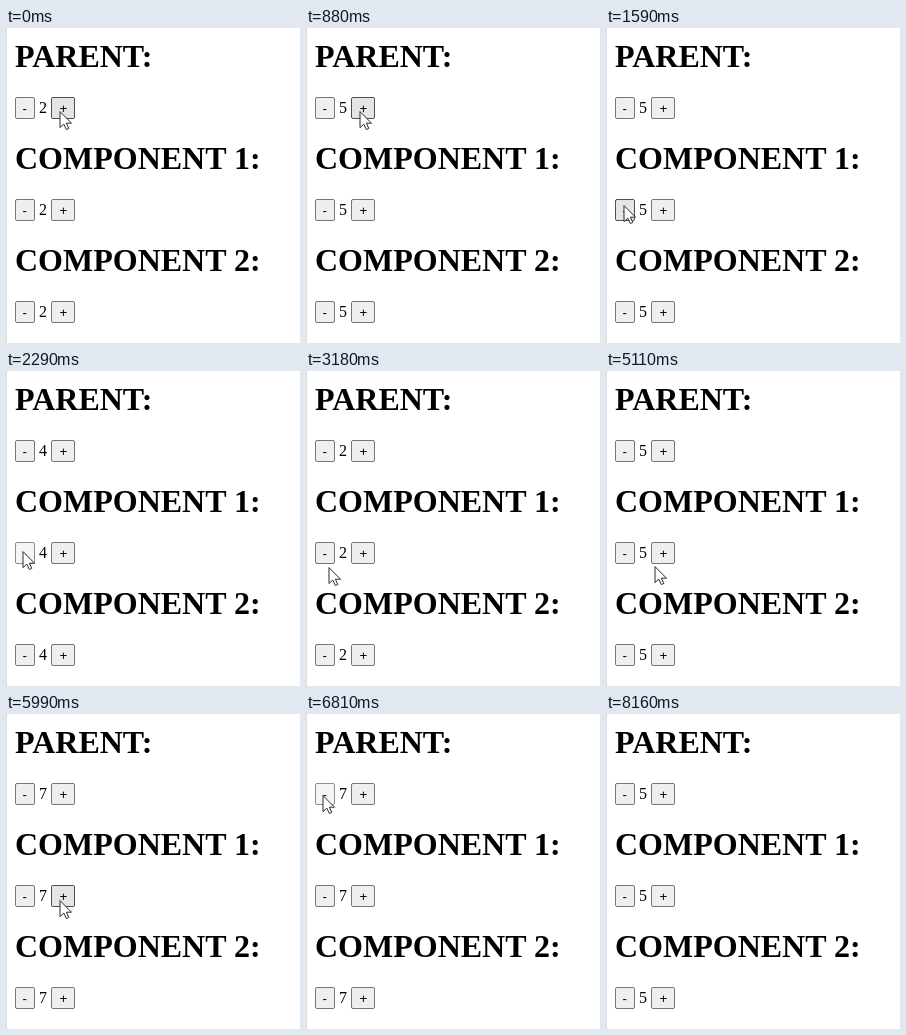
Write an HTML page that moves like this. It is 294 by 315 pixels and loops after 8590 ms.

```html
<!DOCTYPE html>
<html lang="en">
<head>
<meta charset="utf-8">
<title>Shared counter</title>
<style>
  html, body { margin: 0; width: 100%; height: 100%; overflow: hidden; background: #fff; }
  svg { display: block; width: 294px; height: 315px; }
  text { fill: #000; }
  .title { font: bold 32px "Liberation Serif", "Times New Roman", serif; }
  .value { font: 16px "Liberation Serif", "Times New Roman", serif; }
  .label { font: 13.333px "Liberation Sans", Arial, sans-serif; }
  .box { fill: #efefef; stroke: #767676; }
  .hover { fill: #e5e5e5; stroke: #4f4f4f; }
  .down { fill: #f5f5f5; stroke: #8d8d8d; }
</style>
</head>
<body>
<svg viewBox="0 0 294 315">
  <rect width="1" height="315" fill="#dcdcdc"/>
  <g id="panels"></g>
  <path id="cursor" d="M0 .6V16.6L3.8 13.1L6.3 18.5L8.8 17.5L6.4 12.2H11.5Z"
        fill="#fff" stroke="#2b2b33" stroke-linejoin="round"/>
</svg>
<script>
const LOOP = 8590;
const BEAT = 137;  // time between pointer jumps
const HOLD = 130;  // time a button stays pressed
const GONE = 8160; // pointer has left
const START = 2;

const linear = p => p;
const easeIn = p => p * p;
const easeOut = p => 1 - (1 - p) ** 2;
const easeBoth = p => (1 - Math.cos(Math.PI * p)) / 2;

const home = { x: 54, y: 83 };
const trips = [
  { at: 1010, jumps: 6, x: 17, y: 180, ease: easeOut },
  { at: 3180, jumps: 4, x: 58, y: 287, ease: easeBoth },
  { at: 4800, jumps: 3, x: 49, y: 195, ease: linear },
  { at: 5240, jumps: 1, x: 54, y: 186, ease: linear },
  { at: 6270, jumps: 4, x: 17, y: 81, ease: easeBoth },
  { at: 7660, jumps: 4, x: 224, y: 287, ease: easeIn }
];

const bursts = [
  { at: 150, times: 3, gap: 290, change: 1 },
  { at: 1850, times: 1, gap: 0, change: -1 },
  { at: 2290, times: 2, gap: 280, change: -1 },
  { at: 3770, times: 3, gap: 300, change: 1 },
  { at: 5390, times: 2, gap: 450, change: 1 },
  { at: 6810, times: 2, gap: 290, change: -1 }
];
const clicks = bursts.flatMap(b =>
  Array.from({ length: b.times }, (_, i) => ({ at: b.at + i * b.gap, change: b.change })));

const panels = document.getElementById("panels");
const cursor = document.getElementById("cursor");
const values = [];
const buttons = [];

function add(tag, attrs, content = "") {
  const el = document.createElementNS("http://www.w3.org/2000/svg", tag);
  for (const key in attrs) el.setAttribute(key, attrs[key]);
  el.textContent = content;
  panels.append(el);
  return el;
}

function addButton(x, y, w, sign, signX) {
  const el = add("rect", { x: x + .5, y: y + .5, width: w - 1, height: 21, rx: 1.5, class: "box" });
  add("text", { x: signX, y: y + 16, class: "label" }, sign);
  buttons.push({ el, x, y, w });
}

["PARENT:", "COMPONENT 1:", "COMPONENT 2:"].forEach((title, i) => {
  const y = 69 + i * 102;
  add("text", { x: 9, y: y - 30, class: "title" }, title);
  addButton(9, y, 20, "-", 16.5);
  values.push(add("text", { x: 33, y: y + 16, class: "value" }));
  addButton(45, y, 24, "+", 53.5);
});

function pointer(t) {
  let { x, y } = home;
  for (const trip of trips.filter(trip => trip.at <= t)) {
    const jump = Math.floor((t - trip.at) / BEAT) + 1;
    const p = trip.ease(Math.min(1, jump / trip.jumps));
    x += (trip.x - x) * p;
    y += (trip.y - y) * p;
  }
  return { x: Math.round(x), y: Math.round(y) };
}

function draw(t) {
  const { x, y } = pointer(t);
  cursor.setAttribute("transform", `translate(${x} ${y})`);
  cursor.setAttribute("visibility", t < GONE ? "visible" : "hidden");

  const done = clicks.filter(c => c.at + HOLD <= t);
  const count = done.reduce((sum, c) => sum + c.change, START);
  for (const v of values) v.textContent = count;

  const down = clicks.some(c => c.at <= t && t < c.at + HOLD);
  for (const b of buttons) {
    const over = x >= b.x && x < b.x + b.w && y >= b.y && y < b.y + 22;
    b.el.setAttribute("class", "box" + (over ? (down ? " down" : " hover") : ""));
  }
}

const begin = performance.now();
function tick() {
  draw((performance.now() - begin) % LOOP);
  requestAnimationFrame(tick);
}
draw(0);
requestAnimationFrame(tick);
</script>
</body>
</html>
```
